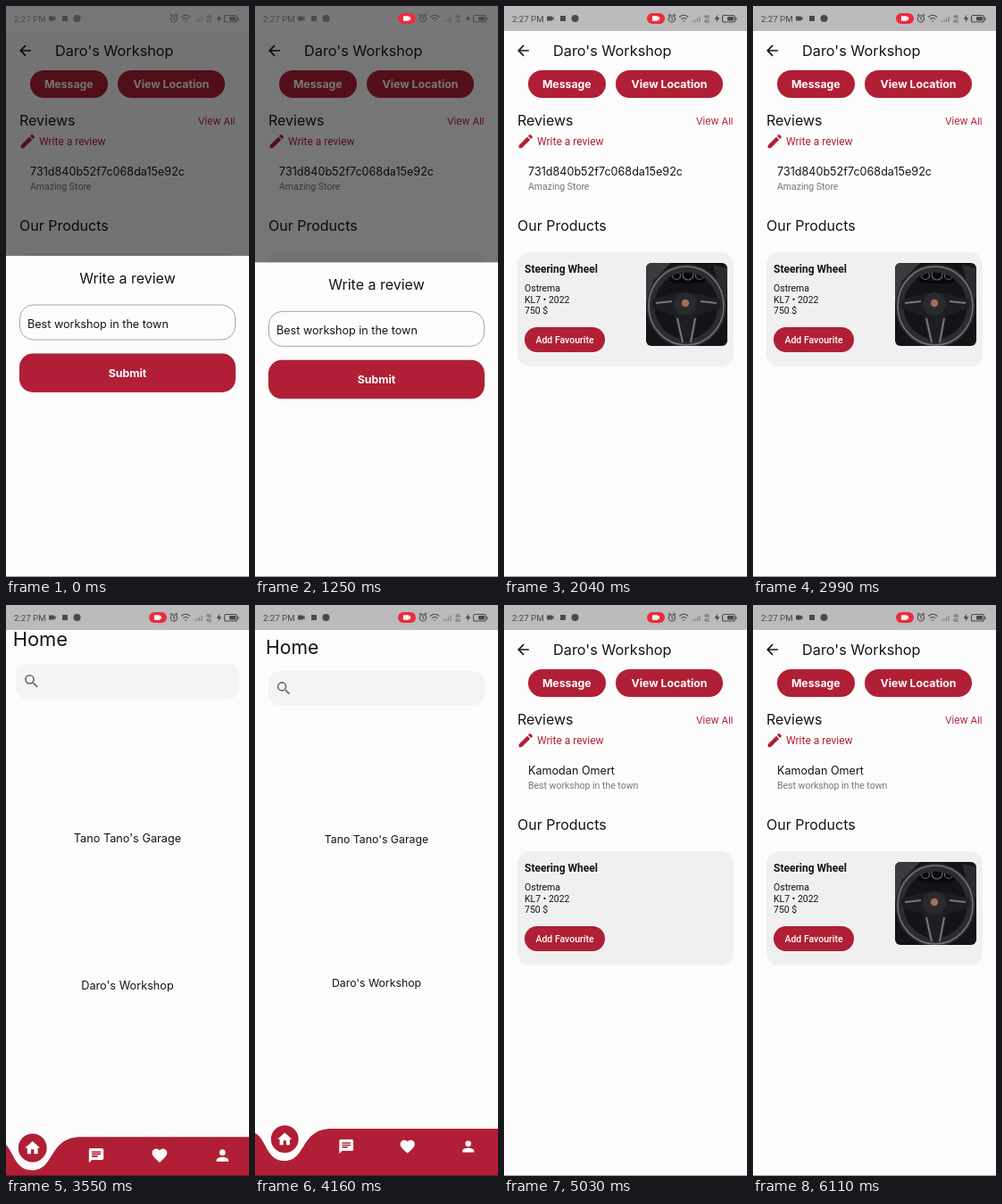
An HTML page for the animation above (6160 ms loop, 272x640 px).

```html
<!DOCTYPE html>
<html lang="en">
<head>
<meta charset="utf-8">
<title>Workshop review</title>
<style>
  html, body { margin: 0; width: 100%; height: 100%; overflow: hidden; background: #fdfcfd; }
  svg { display: block; width: 100%; height: 100%; }
  text { font-family: Inter, "Open Sans", sans-serif; fill: #141414; }
  .r { font-family: Roboto, "Noto Sans", sans-serif; }
  .mid { text-anchor: middle; }
  .h { font-size: 16px; }
  .row { font-size: 12.6px; }
  .sub { font-size: 10.5px; fill: #777; }
  .btn { font-size: 12.3px; font-weight: 700; fill: #fff; text-anchor: middle; }
  .link { fill: #b01f35; }
  .bg { fill: #fdfcfd; }
  .red { fill: #b01f35; }
</style>
</head>
<body>
<svg id="stage" viewBox="0 0 272 640" preserveAspectRatio="none"></svg>
<script>
const LOOP = 6160;

const ICONS = {
  back: 'M20 11H7.83l5.59-5.59L12 4l-8 8 8 8 1.41-1.41L7.83 13H20z',
  pencil: 'M3 17.25V21h3.75L17.81 9.94l-3.75-3.75zM20.71 7.04a1 1 0 0 0 0-1.41l-2.34-2.34a1 1 0 0 0-1.41 0l-1.83 1.83 3.75 3.75z',
  search: 'M15.5 14h-.79l-.28-.27A6.47 6.47 0 0 0 16 9.5 6.5 6.5 0 1 0 9.5 16c1.61 0 3.09-.59 4.23-1.57l.27.28v.79l5 4.99L20.49 19zm-6 0a4.5 4.5 0 1 1 0-9 4.5 4.5 0 0 1 0 9z',
  home: 'M10 20v-6h4v6h5v-8h3L12 3 2 12h3v8z',
  chat: 'M20 2H4a2 2 0 0 0-2 2v18l4-4h14a2 2 0 0 0 2-2V4a2 2 0 0 0-2-2zM6 9h12v2H6zm8 5H6v-2h8zm4-6H6V6h12z',
  heart: 'M12 21.35l-1.45-1.32C5.4 15.36 2 12.28 2 8.5 2 5.42 4.42 3 7.5 3c1.74 0 3.41.81 4.5 2.09C13.09 3.81 14.76 3 16.5 3 19.58 3 22 5.42 22 8.5c0 3.78-3.4 6.86-8.55 11.54z',
  person: 'M12 12a4 4 0 1 0 0-8 4 4 0 0 0 0 8zm0 2c-2.67 0-8 1.34-8 4v2h16v-2c0-2.66-5.33-4-8-4z',
  camera: 'M17 10.5V7a1 1 0 0 0-1-1H4a1 1 0 0 0-1 1v10a1 1 0 0 0 1 1h12a1 1 0 0 0 1-1v-3.5l4 4v-11z',
  bolt: 'M14 2 5 14h6l-1 8 9-12h-6z'
};

const icon = (name, x, y, s, fill) =>
  `<path d="${ICONS[name]}" fill="${fill}" fill-rule="evenodd" transform="translate(${x} ${y}) scale(${s}) translate(-12 -12)"/>`;
const rect = (x, y, w, h, r, attrs) =>
  `<rect x="${x}" y="${y}" width="${w}" height="${h}" rx="${r}" ${attrs}/>`;
const text = (x, y, cls, str, attrs = '') =>
  `<text x="${x}" y="${y}" class="${cls}" ${attrs}>${str}</text>`;

const homeView = `
  ${rect(0, 0, 272, 640, 0, 'class="bg"')}
  ${text(12, 55.3, '', 'Home', 'font-size="21.2"')}
  ${rect(15, 74, 242, 39, 13, 'fill="#f5f4f4"')}
  ${icon('search', 32.2, 93.4, .81, '#6a6a6a')}
  ${text(136, 267.4, 'mid', "Tano Tano's Garage", 'font-size="12.3"')}
  ${text(136, 427.5, 'mid', "Daro's Workshop", 'font-size="12.3"')}
  <path class="red" d="M0 592C13 598 12 623 33 623C58 623 50 587 86 587H272V640H0Z"/>
  <circle class="red" cx="33.3" cy="598.7" r="15.4"/>
  ${icon('home', 33.3, 598.7, .81, '#fff')}
  ${icon('chat', 102.2, 607, .79, '#fff')}
  ${icon('heart', 170.7, 607, .81, '#fff')}
  ${icon('person', 238.7, 607, .81, '#fff')}`;

const photo = `
  <g clip-path="url(#photoClip)">
    ${rect(159, 288, 91, 93, 0, 'fill="#131417"')}
    <path d="M159 288h28l-20 20-8 26z" fill="#3a3b3e"/>
    <path d="M234 290l16 4v36l-10-18z" fill="#2a2b2e"/>
    ${rect(184, 292, 43, 19, 8, 'fill="#08090b"')}
    <g fill="none" stroke="#66676b" stroke-width="1.2">
      <circle cx="193" cy="302" r="4.5"/><circle cx="206" cy="301" r="6"/><circle cx="219" cy="302" r="4.5"/>
    </g>
    <ellipse cx="204" cy="336" rx="40" ry="42" fill="none" stroke="#2b2c2f" stroke-width="9"/>
    <ellipse cx="204" cy="336" rx="42" ry="44" fill="none" stroke="#727376" stroke-width="1.5"/>
    <path d="M166 329l26-7h23l27 7v10l-25 8-6 30h-14l-6-30-25-8z" fill="#1d1e21"/>
    <path d="M194 350l6 27M214 350l-5 27M170 333l18-2M220 331l18 2" stroke="#77787b" stroke-width="2"/>
    <circle cx="203" cy="334" r="13" fill="#292a2d"/>
    <circle cx="203" cy="333" r="4.2" fill="#a0705c"/>
  </g>`;

const shopView = `
  ${rect(0, 0, 272, 640, 0, 'class="bg"')}
  ${icon('back', 21.5, 50, .8, '#141414')}
  ${text(55, 55.5, 'h', "Daro's Workshop", 'style="font-size:16.3px"')}
  ${rect(27, 72, 87, 31, 15.5, 'class="red"')}${text(70.3, 92, 'btn', 'Message')}
  ${rect(125, 72, 120, 31, 15.5, 'class="red"')}${text(185, 92, 'btn', 'View Location')}
  ${text(15, 134, 'h', 'Reviews')}
  ${text(256.5, 133, 'link', 'View All', 'font-size="11" text-anchor="end"')}
  ${icon('pencil', 24.3, 151.7, .85, '#b01f35')}
  ${text(37, 156, 'r link', 'Write a review', 'font-size="12"')}
  <text id="author" x="27" y="190" class="row"></text>
  <text id="review" x="27" y="205.5" class="r sub"></text>
  ${text(15, 252, 'h', 'Our Products')}
  ${rect(15, 276, 242, 128, 14, 'fill="#f1f0f0"')}
  ${text(23, 299, 'r', 'Steering Wheel', 'font-size="12" font-weight="700"')}
  ${['Ostrema', 'KL7 • 2022', '750 $'].map((s, i) => text(23, 320 + 12.6 * i, 'r', s, 'font-size="10.5"')).join('')}
  ${rect(23, 360, 90, 28, 14, 'class="red"')}
  ${text(68, 378, 'r btn', 'Add Favourite', 'style="font-size:10.5px;font-weight:500"')}
  <g id="photo">${photo}</g>`;

const sheetView = `
  ${rect(0, 280, 272, 360, 0, 'class="bg"')}
  ${text(136, 311, 'h mid', 'Write a review')}
  ${rect(15.5, 335, 241, 39, 15, 'fill="none" stroke="#8f8f8c" stroke-width=".8"')}
  ${text(24, 361, 'row', 'Best workshop in the town')}
  ${rect(15, 389.5, 242, 43.5, 15, 'class="red"')}
  ${text(136, 416, 'btn', 'Submit')}`;

const ink = '#4a4a4a';
const statusBar = `
  ${rect(0, 0, 272, 28, 0, 'fill="#7c7b7b" fill-opacity=".5"')}
  ${text(9, 18, 'r', '2:27 PM', `font-size="9.7" style="fill:${ink}"`)}
  ${icon('camera', 51.8, 14, .42, ink)}
  ${rect(63, 11, 6, 6, 0, `fill="${ink}"`)}
  <circle cx="79.5" cy="14" r="4" fill="${ink}"/>
  <g id="pill">
    ${rect(160, 8, 20, 12, 6, 'fill="#ea2c3c"')}
    ${icon('camera', 170, 14, .45, '#fff')}
  </g>
  <g fill="none" stroke="${ink}" stroke-width="1.1">
    <circle cx="188" cy="14.4" r="3.6"/>
    <path d="M188 12v2.6l1.6 1M184 11l2-2M192 11l-2-2"/>
    <path d="M196.2 12.5q5-4.5 10 0M198.2 14.8q3-2.6 6 0M200.2 17h2"/>
    <path d="M211.5 18v-1.5M214 18v-3M216.5 18v-4.5M219 18v-6" stroke-opacity=".55"/>
    <rect x="244.5" y="10.5" width="14" height="7.5" rx="2"/>
    <path d="M260 13v3"/>
  </g>
  ${text(224, 13.5, 'r', '46', `font-size="5.5" style="fill:${ink}"`)}
  ${text(224, 18.5, 'r', '4G', `font-size="5" style="fill:${ink}"`)}
  ${icon('bolt', 238.5, 14, .42, ink)}
  ${rect(250, 12, 7, 4.5, 1, `fill="${ink}"`)}
  ${rect(0, 639, 272, 1, 0, 'fill="#000" fill-opacity=".35"')}`;

const stage = document.getElementById('stage');
stage.innerHTML = `
  <defs><clipPath id="photoClip">${rect(159, 288, 91, 93, 6, '')}</clipPath></defs>
  <g id="home">${homeView}</g>
  <rect id="dim" width="272" height="640"/>
  <g id="shop">${shopView}</g>
  <rect id="scrim" width="272" height="640"/>
  <g id="sheet">${sheetView}</g>
  ${statusBar}`;

const el = {};
for (const node of stage.querySelectorAll('[id]')) el[node.id] = node;

const span = (t, a, b) => Math.min(1, Math.max(0, (t - a) / (b - a)));
const mix = (a, b, k) => a + (b - a) * k;
const cubic = (u, [a, b, c, d]) => {
  const v = 1 - u;
  return v * v * v * a + 3 * v * v * u * b + 3 * v * u * u * c + u * u * u * d;
};

// Height of a Bezier curve at x, found by bisection.
function curve(x, px, py) {
  let lo = 0, hi = 1;
  for (let i = 0; i < 24; i++) {
    const m = (lo + hi) / 2;
    if (cubic(m, px) < x) lo = m; else hi = m;
  }
  return cubic(hi, py);
}
const ease = x => curve(x, [0, .25, .25, 1], [0, .1, 1, 1]);
const decelerate = x => curve(x, [0, 0, .2, 1], [0, 0, 1, 1]);

// Fast-out, extra-slow-in: two joined curves.
const KNEE = 1 / 6;
const emphasized = x => x < KNEE
  ? curve(x, [0, .05, .1333, KNEE], [0, 0, .06, .4])
  : curve(x, [KNEE, .2083, .25, 1], [.4, .82, 1, 1]);

const zoom = (node, s) =>
  node.setAttribute('transform', `translate(136 320) scale(${s}) translate(-136 -320)`);
const fade = (node, o) => {
  node.setAttribute('opacity', o);
  node.style.display = o > 0 ? '' : 'none';
};

function draw(t) {
  const open = 1 - span(t, 1217, 1395);
  const pop = span(t, 3490, 3790);
  const push = span(t, 4715, 5015);
  const posted = t > 4200;

  const pill = span(t, 50, 300);
  fade(el.pill, pill);
  el.pill.setAttribute('transform', `translate(170 14) scale(${mix(.5, 1, pill)}) translate(-170 -14)`);

  el.sheet.setAttribute('transform', `translate(0 ${360 * (1 - decelerate(open))})`);
  fade(el.sheet, open > 0 ? 1 : 0);
  fade(el.scrim, open > 0 ? .54 * ease(open) : 0);

  if (posted) {
    const k = emphasized(push);
    zoom(el.home, mix(1, 1.05, k));
    zoom(el.shop, mix(.85, 1, k));
    fade(el.shop, span(push, .1, .2));
  } else {
    const k = emphasized(pop);
    zoom(el.home, mix(1.1, 1, k));
    zoom(el.shop, mix(1, .9, k));
    fade(el.shop, 1 - span(pop, .0825, .19));
  }
  fade(el.dim, posted ? .6 * span(push, .14, .36) : 0);
  fade(el.photo, posted && t < 5140 ? 0 : 1);

  el.author.textContent = posted ? 'Kamodan Omert' : '731d840b52f7c068da15e92c';
  el.review.textContent = posted ? 'Best workshop in the town' : 'Amazing Store';
}

const start = performance.now();
function tick() {
  draw((performance.now() - start) % LOOP);
  requestAnimationFrame(tick);
}
tick();
</script>
</body>
</html>
```
